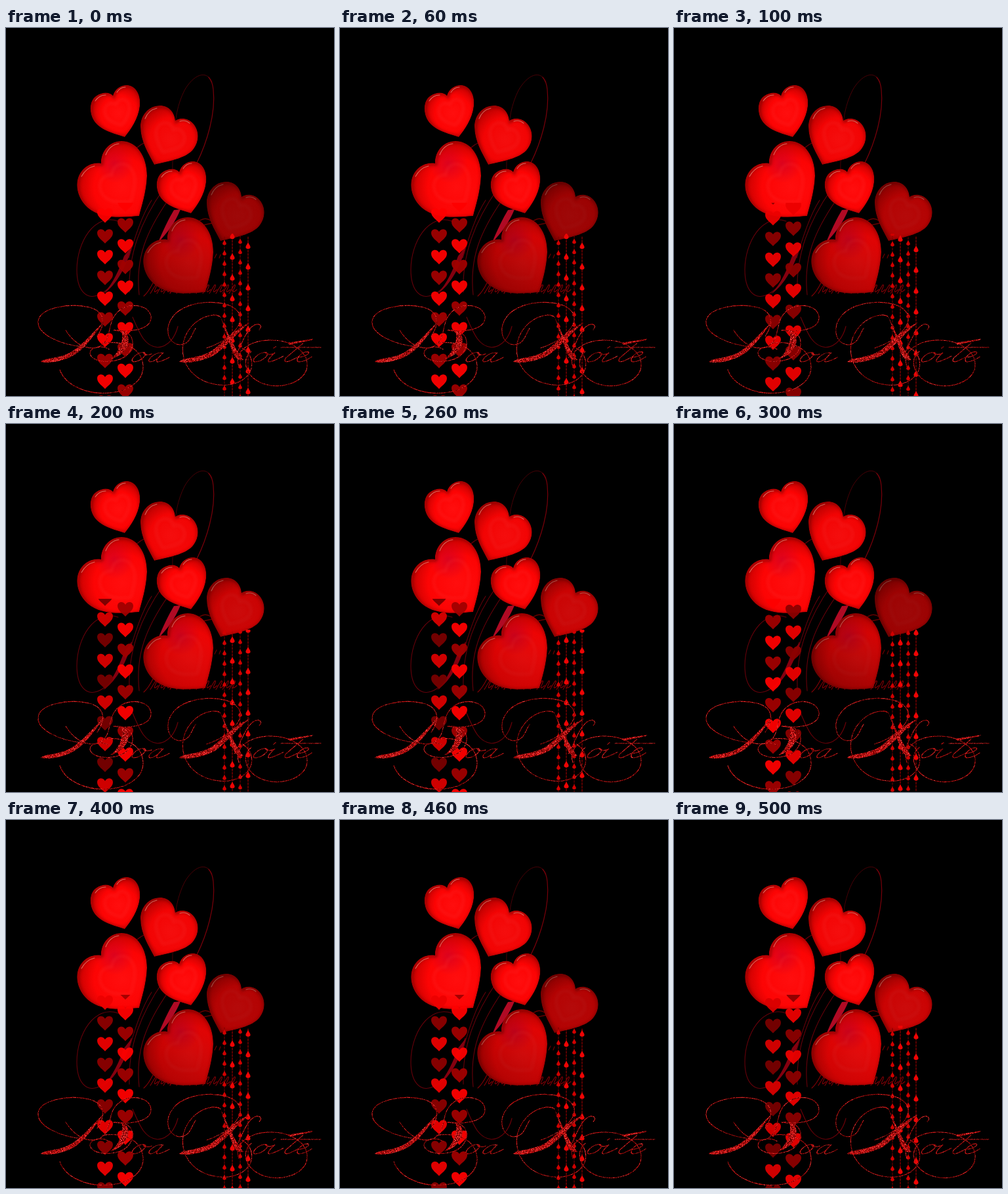
These frames come from a looping animation (500 px wide and 560 px high, 600 ms). An HTML page with a canvas:

```html
<!DOCTYPE html>
<html lang="pt">
<head>
<meta charset="utf-8">
<title>Boa Noite</title>
<style>
html, body { margin: 0; width: 100%; height: 100%; overflow: hidden; background: #000; }
canvas { display: block; }
</style>
</head>
<body>
<canvas id="stage" width="500" height="560" role="img" aria-label="Boa Noite"></canvas>
<script>
const ctx = document.getElementById('stage').getContext('2d');
const STEP = 100, COUNT = 6, GAP = 31.6;
const dropA = [0, 4, 12, 16, 24, 28];
const dropB = [0, 5, 13, 17, 25, 29];

function random(seed) {
  return () => {
    seed = (seed * 1664525 + 1013904223) >>> 0;
    return seed / 4294967296;
  };
}

function stroke(d, color, width = 1) {
  ctx.strokeStyle = color;
  ctx.lineWidth = width;
  ctx.stroke(new Path2D(d));
}

function fill(d, color) {
  ctx.fillStyle = color;
  ctx.fill(new Path2D(d));
}

// Large glossy hearts: outline, centre, gloss arcs
const shapes = {
  small: {
    d: 'M163 103C166 92 176 86 186 87C199 89 206 103 204 119C202 138 190 155 181 166C165 161 144 156 134 141C126 128 127 110 138 103C147 97 158 97 163 103Z',
    x: 172, y: 130, r: 50,
    gloss: 'M136 111Q142 102 152 102M169 98Q174 90 182 90'
  },
  medium: {
    d: 'M258 141C264 136 277 136 285 145C295 156 295 172 286 184C275 199 246 203 226 208C217 191 205 172 205 150C205 133 217 118 235 118C248 118 257 128 258 141Z',
    x: 252, y: 170, r: 60,
    gloss: 'M212 138Q217 125 230 122M265 142Q273 139 280 145'
  },
  large: {
    d: 'M145 206C144 190 156 172 176 172C200 172 215 196 215 225C214 250 207 270 203 286C180 288 145 292 124 273C108 258 104 236 113 221C121 208 134 204 145 206Z',
    x: 178, y: 242, r: 80,
    gloss: 'M115 226Q122 213 135 210M152 193Q158 178 172 176',
    tint: [165, 206, 30]
  }
};

function bigHeart(name, dx, dy, shadeTop, shadeBottom = shadeTop) {
  const s = shapes[name], path = new Path2D(s.d);
  ctx.save();
  ctx.translate(dx, dy);
  ctx.clip(path);
  const g = ctx.createRadialGradient(s.x, s.y, 0, s.x, s.y, s.r);
  g.addColorStop(0, '#ff0e0e');
  g.addColorStop(.55, '#fc0404');
  g.addColorStop(1, '#b00000');
  ctx.fillStyle = g;
  ctx.fill(path);

  if (s.tint) {
    const [x, y, r] = s.tint;
    const t = ctx.createRadialGradient(x, y, 0, x, y, r);
    t.addColorStop(0, 'rgba(180,0,60,.45)');
    t.addColorStop(1, 'rgba(180,0,60,0)');
    ctx.fillStyle = t;
    ctx.fill(path);
  }

  // Rim shadow, heavier on the upper left
  ctx.save();
  ctx.translate(1.5, 1.5);
  ctx.filter = 'blur(2px)';
  ctx.strokeStyle = 'rgba(110,0,0,.6)';
  ctx.lineWidth = 4;
  ctx.stroke(path);
  ctx.restore();

  // Soft raised face
  ctx.save();
  ctx.filter = 'blur(2px)';
  ctx.translate(s.x, s.y);
  ctx.scale(.5, .5);
  ctx.translate(-s.x, -s.y);
  ctx.strokeStyle = 'rgba(255,60,60,.3)';
  ctx.lineWidth = 5;
  ctx.stroke(path);
  ctx.restore();

  ctx.filter = 'blur(.6px)';
  stroke(s.gloss, 'rgba(255,170,150,.6)', 1.1);
  ctx.filter = 'none';
  const shade = ctx.createLinearGradient(s.x + 20, s.y - 50, s.x - 25, s.y + 35);
  shade.addColorStop(0, `rgba(0,0,0,${shadeTop})`);
  shade.addColorStop(1, `rgba(0,0,0,${shadeBottom})`);
  ctx.fillStyle = shade;
  ctx.fill(path);
  ctx.restore();
}

// Dark flourish behind the hearts
function flourish() {
  ctx.lineCap = 'round';
  const dim = '#480006', dark = '#66000a';
  stroke('M314 82C305 62 285 72 272 95C262 115 256 140 258 170C258 190 250 205 256 225', dim);
  stroke('M291 205C306 175 320 130 316 94Q315 82 309 75', '#78000a', 1.2);
  stroke('M212 174C190 185 178 205 170 230M240 245C205 295 186 345 188 402M247 262C214 310 197 350 203 406M222 262C207 285 196 320 187 350', dark, 1.1);
  stroke('M171 294C135 281 108 326 108 368C108 399 122 413 139 407C165 398 181 360 191 332', dark, 1.1);
  fill('M192 332C185 360 169 391 148 405C164 388 173 366 180 347Z', '#84000f');
  fill('M266 276C258 296 246 312 232 326C239 309 248 290 256 277Z', '#b00a24');
  stroke('M193 440C205 468 212 484 231 486C248 485 258 470 262 454', '#680008', 1.2);
  stroke('M294 294Q304 287 312 293M300 300L314 297M318 350L321 344M325 350L327 345', '#650000', 1.3);
  // Slanted handwriting
  let d = 'M210 408Q217 402 224 388';
  for (let i = 0; i < 13; i++) {
    const x = 220 + i * 10;
    d += `M${x} 404L${x + 8} 391Q${x + 11} 390 ${x + 8} 396Q${x + 3} 406 ${x + 12} 398`;
  }
  stroke(d + 'M250 403L264 382M288 403L301 384', '#820006', 1.1);
}

const heartlet = new Path2D('M0 12C-3 8 -12 3 -12 -4C-12 -11 -3 -12 0 -6C3 -12 12 -11 12 -4C12 3 3 8 0 12Z');
const bead = new Path2D('M0 -6C1 -3 3.6 -1 3.6 1.5C3.6 5 -3.6 5 -3.6 1.5C-3.6 -1 -1 -3 0 -6Z');

function stamp(path, x, y, scale, color) {
  ctx.save();
  ctx.translate(x, y);
  ctx.scale(scale, scale);
  ctx.fillStyle = color;
  ctx.fill(path);
  ctx.restore();
}

// Colours swap between neighbours, then fade until the next swap
function heartString(x, top, brightParity, fade) {
  ctx.save();
  ctx.beginPath();
  ctx.rect(x - 14, 266, 28, 294);
  ctx.clip();
  for (let k = -2; k < 10; k++) {
    const bright = (k & 1) === brightParity;
    const red = bright ? 254 - 18 * fade : 160 - 20 * fade;
    stamp(heartlet, x, top + k * GAP, 1, `rgba(${red},0,0,.95)`);
  }
  ctx.restore();
}

function beadString(x, top, gap, scale, line) {
  ctx.save();
  ctx.beginPath();
  ctx.rect(x - 5, 313, 10, 247);
  ctx.clip();
  ctx.setLineDash([3, 2]);
  ctx.lineDashOffset = -top;
  stroke(`M${x} 316V560`, line, 1);
  for (let y = top - 2 * gap; y < 570; y += gap) {
    if (y > 312) stamp(bead, x, y, scale, scale < 1 ? '#d00000' : '#ee0505');
  }
  ctx.restore();
}

// Glitter swatches
const tones = ['#7a0000', '#a80808', '#c81010', '#e01c1c', '#f04040', '#520000'];
const glitter = Array.from({ length: COUNT }, (_, i) => {
  const tile = document.createElement('canvas');
  tile.width = tile.height = 96;
  const c = tile.getContext('2d'), rnd = random(71 + i * 997);
  for (let y = 0; y < 96; y++) {
    for (let x = 0; x < 96; x++) {
      c.fillStyle = tones[rnd() * tones.length | 0];
      c.fillRect(x, y, 1, 1);
    }
  }
  return ctx.createPattern(tile, 'repeat');
});

const swashes = [
  // B
  'M117 485C83 482 47 466 49 446C52 425 98 418 127 425C153 432 151 452 139 469',
  'M91 460C102 477 119 491 140 486C166 475 150 446 174 429C192 416 222 423 221 442C219 461 183 463 164 460',
  'M164 460C194 457 201 482 184 498C168 512 130 510 128 495C128 484 149 483 157 489',
  'M82 520C91 545 126 559 160 555C190 552 214 534 208 508C203 485 175 475 147 480',
  // N
  'M306 487C345 474 367 446 353 431C337 411 277 413 256 437C240 456 246 479 264 482C281 482 282 467 289 457',
  'M327 440C322 434 299 436 283 454C266 473 265 500 279 519C296 542 334 551 360 536C382 521 377 497 360 487',
  'M348 502C357 488 364 462 377 453C384 448 393 452 386 459',
  'M355 515C347 493 370 476 401 475C437 474 465 495 458 520C451 542 411 553 383 537C363 525 360 503 374 492'
];
const solids = [
  'M53 508C59 501 82 504 101 492C120 479 134 461 150 446C137 464 125 482 108 495C89 508 65 511 53 508Z',
  'M176 461C190 465 189 480 181 490C175 498 167 502 159 504C170 496 181 477 176 461Z',
  'M264 508C270 501 294 503 314 491C333 477 346 460 372 448C352 464 337 484 319 497C299 508 274 511 264 508Z',
  'M327 440C335 455 346 485 362 505C354 507 349 502 346 494C339 478 335 460 327 440Z',
  'M429 479L468 473L466 475L432 482Z'
];
const letters = [
  // oa
  'M205 491C193 490 186 507 195 508C206 508 213 491 204 492Q208 498 217 494',
  'M232 492C220 490 212 507 220 508C227 508 232 497 234 492C230 499 226 509 232 508Q239 506 246 500',
  // oite
  'M391 491C379 490 371 507 380 508C392 508 399 491 390 492Q396 497 403 493',
  'M404 492C400 499 396 508 402 508Q409 506 419 498',
  'M441 475L424 501Q423 510 431 507L443 499',
  'M443 500C454 499 460 491 453 490C443 490 438 507 447 508Q456 507 463 499'
];

function greeting(frame) {
  const paint = glitter[frame];
  ctx.lineCap = ctx.lineJoin = 'round';
  swashes.forEach(d => stroke(d, paint, 1.1));
  solids.forEach(d => fill(d, paint));
  ctx.save();
  ctx.translate(0, 508);
  ctx.transform(1, 0, -.35, .85, 0, 0);
  ctx.translate(0, -508);
  letters.forEach(d => stroke(d, paint, 1.4));
  ctx.restore();
  stroke('M419 486H480', paint, 1);
  stroke('M408 487L411 485', paint, 1.4);
}

function draw(frame) {
  const dim = .28 - .09 * (frame % 3);
  ctx.fillStyle = '#000';
  ctx.fillRect(0, 0, 500, 560);
  flourish();
  bigHeart('small', 0, 0, 0);
  bigHeart('medium', 0, 0, .04);
  bigHeart('large', 0, 0, 0);
  bigHeart('small', 101, 116, 0);
  bigHeart('medium', 101, 116, dim + .1);
  bigHeart('large', 101, 116, dim / 2, dim + .08);

  const a = dropA[frame], b = dropB[frame];
  heartString(151, 284.5 + a, frame < 3 ? 0 : 1, frame % 3);
  heartString(182, 299.5 + b, (frame >> 1) === 1 ? 0 : 1, frame % 2);
  // The fine strings fall at half speed
  beadString(333, 327 + a / 2, GAP / 2, .8, '#780000');
  beadString(345, 317 + a, GAP, 1, '#b00000');
  beadString(357, 325 + b / 2, GAP / 2, .8, '#780000');
  beadString(369, 332 + b, GAP, 1, '#b00000');
  greeting(frame);
}

let last = -1;
function tick() {
  const frame = Math.floor(performance.now() / STEP) % COUNT;
  if (frame !== last) draw(last = frame);
  requestAnimationFrame(tick);
}
tick();
</script>
</body>
</html>
```
